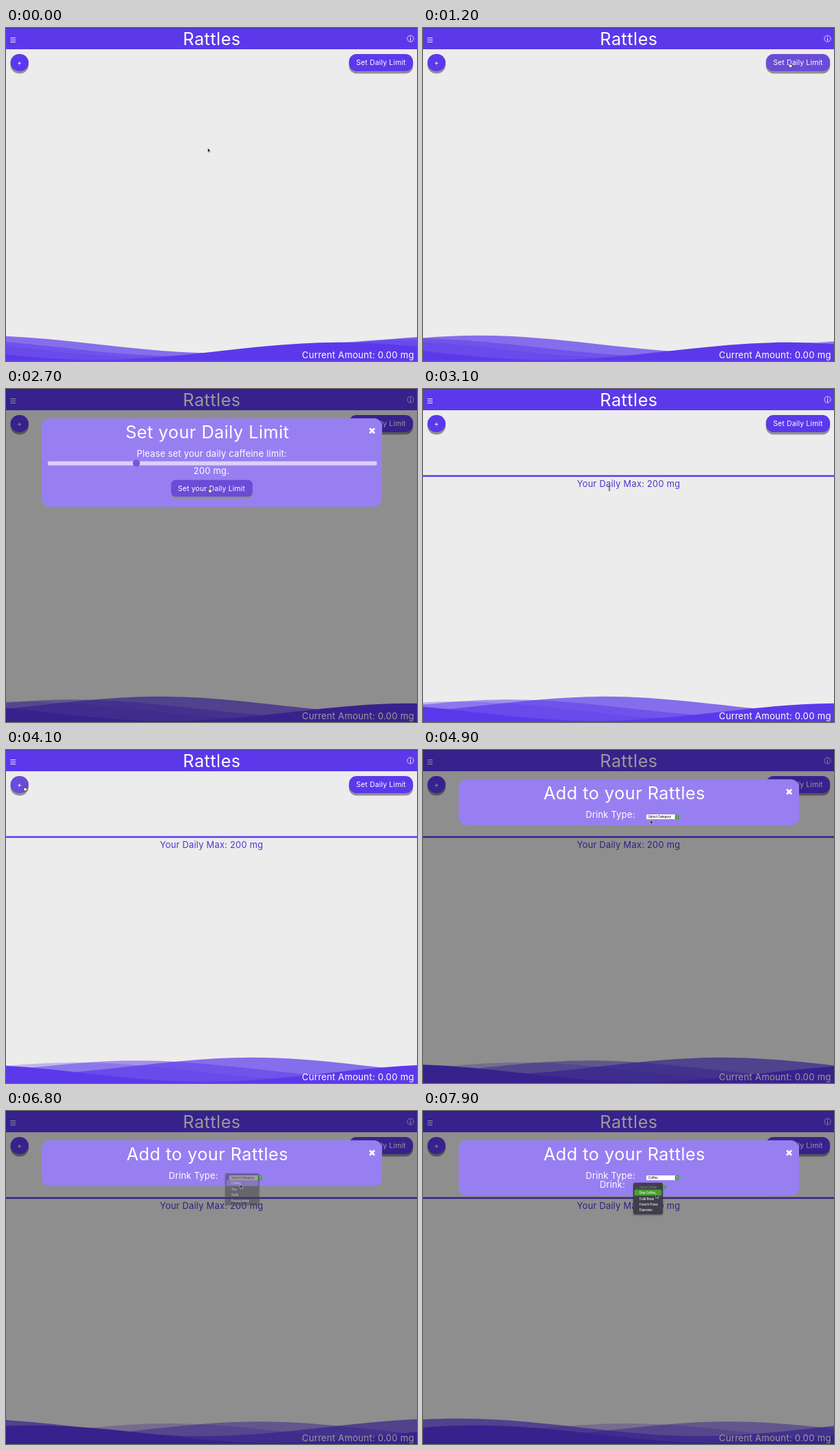
Recreate the animation shown at these times as an HTML page. Size 600 by 486 pixels, loop 8 s.

```html
<!DOCTYPE html>
<html lang="en">
<head>
<meta charset="utf-8">
<title>Daily limit demo</title>
<style>
html, body { margin: 0; width: 100%; height: 100%; overflow: hidden; background: #ececec; }
svg { display: block; width: 600px; height: 486px; }
text { font-family: Montserrat, Inter, sans-serif; letter-spacing: .018em; fill: #fff; }
.mid { text-anchor: middle; }
.title { font-size: 25.3px; }
.body { font-size: 12.9px; }
.btn { font-size: 10.4px; }
.tiny { font: 500 4.3px Inter, sans-serif; letter-spacing: 0; }
.dark { fill: #111; }
.accent { fill: #5b39eb; }
.shade { fill: #8f8f8f; }
.panel { fill: #977ff2; }
#typeMenu, #drinkMenu { filter: drop-shadow(0 1px 1.5px #0006); }
</style>
</head>
<body>
<svg viewBox="0 0 600 486">
  <defs>
    <path id="wave" d="M-160 44c30 0 58-18 88-18s58 18 88 18 58-18 88-18 58 18 88 18v44h-352z"/>
    <path id="close" d="M531 57.5l7 7m0-7l-7 7" stroke="#fff" stroke-width="2.8"/>
  </defs>
  <rect width="600" height="486" fill="#ececec"/>

  <g id="limit">
    <rect class="accent" y="125.7" width="600" height="2.5"/>
    <text class="mid body" x="300" y="142.5" style="fill:#5433d2">Your Daily Max: 200 mg</text>
  </g>

  <g id="waves" class="accent" transform="translate(0 446) scale(4 1.42857) translate(0 -24)"></g>
  <text class="body" x="595.8" y="482" text-anchor="end" style="font-size:13.2px">Current Amount: 0.00 mg</text>

  <rect class="accent" width="600" height="31"/>
  <rect width="600" height="1" fill="#4a30b8"/>
  <path d="M6.5 14.5h7.5m-7.5 3h7.5m-7.5 3h7.5" stroke="#fff" stroke-width="1.2"/>
  <text class="mid title" x="300.5" y="24.5">Rattles</text>
  <circle cx="590.5" cy="15.5" r="4.6" fill="none" stroke="#fff" stroke-width=".8"/>
  <path d="M590.5 12.5v1.2m0 1v4" stroke="#fff"/>

  <rect class="shade" x="6.5" y="41" width="26.5" height="25.5" rx="12.7"/>
  <rect id="addBtn" class="accent" x="6.5" y="38" width="26.5" height="25" rx="12.5"/>
  <text class="mid btn" x="19.7" y="53.8">+</text>
  <rect class="shade" x="500.7" y="41" width="93.5" height="25.5" rx="11"/>
  <rect id="setBtn" class="accent" x="500.7" y="38" width="93.5" height="25" rx="11"/>
  <text class="mid btn" x="547.5" y="54">Set Daily Limit</text>

  <rect id="overlay" width="600" height="486" opacity=".4"/>

  <g id="limitBox">
    <rect class="panel" x="52" y="42.7" width="497" height="129" rx="12"/>
    <text class="mid title" x="294" y="72">Set your Daily Limit</text>
    <use href="#close"/>
    <text class="mid body" x="300.5" y="99">Please set your daily caffeine limit:</text>
    <rect x="61" y="105.5" width="480.5" height="6" rx="2" fill="#dbd0fa"/>
    <circle cx="190.3" cy="108.3" r="5.2" fill="#7258dc"/>
    <text class="mid body" x="300" y="124">200 mg.</text>
    <rect class="shade" x="241" y="136" width="119" height="24.5" rx="6.5"/>
    <rect id="saveBtn" class="accent" x="241" y="132.8" width="119" height="24.4" rx="6.5"/>
    <text class="mid btn" x="300" y="148.7">Set your Daily Limit</text>
  </g>

  <g id="drinkBox">
    <rect id="drinkPanel" class="panel" x="52" y="42.7" width="497" rx="12"/>
    <text class="mid title" x="294" y="72">Add to your Rattles</text>
    <use href="#close"/>
    <text class="mid body" x="273.5" y="99">Drink Type:</text>
    <g id="typeSelect"></g>
    <g id="drinkRow">
      <text class="mid body" x="276.5" y="112.3">Drink:</text>
      <g id="drinkSelect"></g>
    </g>
    <g id="typeMenu"></g>
    <g id="drinkMenu"></g>
  </g>

  <g id="cursor" stroke-width=".6" stroke-linejoin="round">
    <path id="arrow" d="M0 0v6.2l1.4-1.2 1 2.2 1-.5-1-2.1h1.8z" fill="#111" stroke="#ddd"/>
    <path id="hand" d="M-.7 0q.7-.7 1.3 0v2.2l2.6.7q.7.3.5 1.2l-.6 2.6h-3l-2-2.6q0-.9.9-.6l.3.3z" fill="#fff" stroke="#111"/>
    <path id="beam" d="M-1.5-3.5q1.5 0 1.5 1v5q0 1-1.5 1m3 0q-1.5 0-1.5-1v-5q0-1 1.5-1" fill="none" stroke="#444" stroke-width=".8"/>
  </g>
</svg>
<script>
const $ = id => document.getElementById(id);
const show = (id, on) => $(id).style.display = on ? '' : 'none';

const selectBox = (x, y, w, label) => `
  <rect x="${x}" y="${y}" width="${w}" height="7" rx="1.5" fill="#fff"/>
  <text class="tiny dark" x="${x + 3}" y="${y + 5.1}">${label}</text>
  <rect x="${x + w - 6.7}" y="${y}" width="6.7" height="7" rx="1.5" fill="#479447"/>
  <path d="M${x + w - 4.7} ${y + 2.8}l1.3-1.3 1.3 1.3m0 1.5l-1.3 1.3-1.3-1.3" fill="none" stroke="#fff" stroke-width=".7"/>`;

const menu = (id, x, y, w, items) => {
  $(id).innerHTML = `<rect x="${x}" y="${y}" width="${w}" height="46" rx="2.5" fill="#403e4b"/>
    <rect class="pick" x="${x + 1.7}" y="${y + 10}" width="${w - 3.4}" height="8.6" rx="1.5" fill="#48a02f"/>
    <text class="tiny" x="${x + 3}" y="${y + 8}" style="fill:#85838c">✓</text>` +
    items.map((s, i) => `<text class="tiny" x="${x + 9}" y="${y + 8 + i * 8.4}"
      style="fill:${i ? '#fff' : '#85838c'}">${s}</text>`).join('');
};

$('drinkSelect').innerHTML = selectBox(313, 107.5, 42, 'Select Drink');
menu('typeMenu', 320, 91, 49.5, ['Select Category', 'Coffee', 'Tea', 'Soda', 'Energy drink']);
menu('drinkMenu', 307, 104.8, 43, ['Select Drink', 'Drip Coffee', 'Cold Brew', 'French Press', 'Espresso']);

// Wave layers: vertical offset, opacity, period and head start in seconds
const layers = [[0, .7, 7, 2], [3, .5, 10, 3], [5, .3, 13, 4], [7, 1, 20, 5]];
$('waves').innerHTML = layers.map(([y, o]) => `<use href="#wave" y="${y}" opacity="${o}"/>`).join('');

// cubic-bezier(.55, .5, .45, .5)
function ease(p) {
  const bez = (a, b, u) => 3 * a * u * (1 - u) ** 2 + 3 * b * u * u * (1 - u) + u ** 3;
  let lo = 0, hi = 1;
  for (let i = 0; i < 24; i++) {
    const u = (lo + hi) / 2;
    if (bez(.55, .45, u) < p) lo = u; else hi = u;
  }
  return bez(.5, .5, lo);
}

// Pointer stops: time, x, y
const stops = [
  [0, 294.5, 175], [200, 294.5, 175], [900, 537, 51], [1300, 535, 51], [1700, 519, 58.5],
  [2500, 298, 144], [2850, 296, 145], [3100, 272, 145], [3900, 27, 53], [4350, 27, 53],
  [4900, 332, 102], [5300, 348, 97], [5700, 348, 97], [6300, 342, 107], [6800, 342, 107],
  [7250, 336, 111], [7500, 336, 111], [7900, 340, 121]
];

function pointer(t) {
  const i = Math.max(1, stops.findIndex(s => s[0] >= t));
  const [t0, x0, y0] = stops[i - 1], [t1, x1, y1] = stops[i];
  const p = (t - t0) / (t1 - t0), k = p * p * (3 - 2 * p);
  return [x0 + (x1 - x0) * k, y0 + (y1 - y0) * k];
}

function draw(t) {
  const within = (a, b) => t >= a && t < b;
  const limitOpen = within(1300, 2900), drinkOpen = t >= 4400, chosen = t >= 6900;

  const seconds = 2.08 + t / 1000;
  layers.forEach(([, , period, lead], i) => {
    const p = (seconds + lead) / period % 1;
    $('waves').children[i].setAttribute('x', 48 - 90 + 175 * ease(p));
  });

  show('limit', t >= 2900);
  show('overlay', limitOpen || drinkOpen);
  show('limitBox', limitOpen);
  show('drinkBox', drinkOpen);
  show('drinkRow', chosen);
  show('typeMenu', within(5600, 6900));
  show('drinkMenu', t >= 7500);
  $('drinkPanel').setAttribute('height', chosen ? 81 : 67);
  $('typeSelect').innerHTML = selectBox(326, 94, 48.5, chosen ? 'Coffee' : 'Select Category');

  const fading = t >= 6800;
  $('typeMenu').style.opacity = fading ? .5 : 1;
  $('typeMenu').querySelector('.pick').style.fill = fading ? '#77757d' : '';
  $('typeMenu').querySelector('.pick').style.display = t < 6100 ? 'none' : '';
  $('drinkMenu').querySelector('.pick').style.display = t < 7700 ? 'none' : '';

  const [x, y] = pointer(t);
  const overSet = within(800, 1300), overSave = within(2400, 2900), overAdd = within(3800, 4400);
  const hover = (id, on) => $(id).style.fill = on ? '#6a4cd6' : '';
  hover('setBtn', overSet);
  hover('saveBtn', overSave);
  hover('addBtn', overAdd);

  const kind = overSet || overSave || overAdd ? 'hand' : within(2900, 3300) ? 'beam' : 'arrow';
  for (const k of ['arrow', 'hand', 'beam']) show(k, k === kind);
  $('cursor').setAttribute('transform', `translate(${x} ${y})`);
}

function loop() {
  draw(Math.floor(performance.now() % 8000 / 100) * 100);
  requestAnimationFrame(loop);
}
loop();
</script>
</body>
</html>
```
